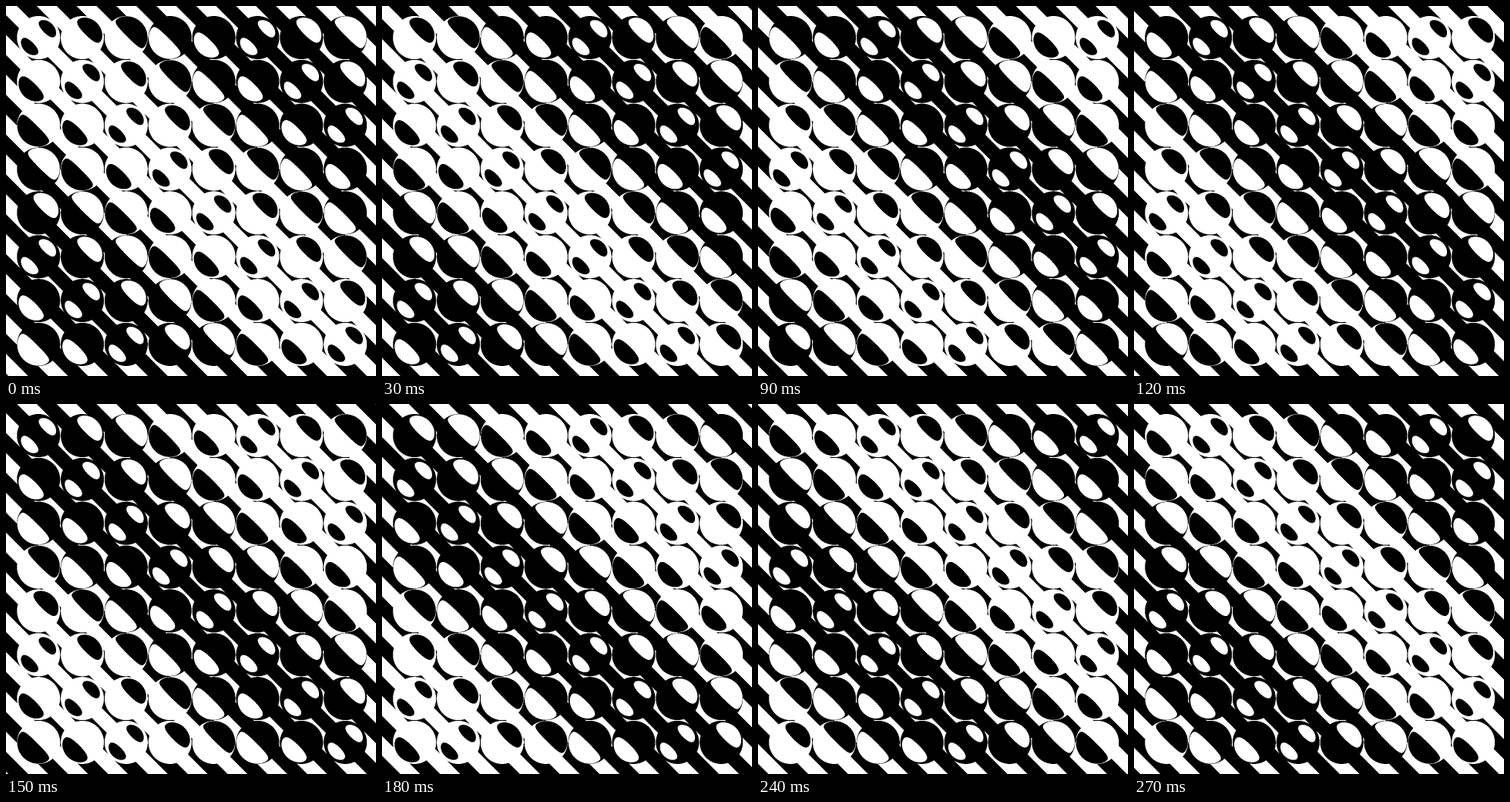
An HTML page with a canvas that plays this animation: 480x480 px, repeating every 300 ms.

```html
<!DOCTYPE html>
<html lang="en">
<head>
<meta charset="utf-8">
<title>Glass balls over stripes</title>
<style>
  html, body { margin: 0; width: 100%; height: 100%; overflow: hidden; background: #fff; }
  canvas { display: block; width: 480px; height: 480px; }
</style>
</head>
<body>
<canvas id="stage" width="480" height="480"></canvas>
<script>
const SIZE = 480, SUB = 3, N = SIZE * SUB;
const COUNT = 8, PITCH = 56.85, RADIUS = 28, X0 = 42.2, Y0 = 41;
const PERIOD = PITCH / 1.1, FALLOFF = 0.65;
const STEPS = 10, STEP_MS = 30;

const ctx = document.getElementById('stage').getContext('2d');
const nearest = v => PITCH * Math.max(0, Math.min(COUNT - 1, Math.round(v / PITCH)));

// Stripe phase at a point; a ball folds the stripes back to its centre at the rim.
function phaseAt(x, y) {
  const cx = nearest(x - X0), cy = nearest(y - Y0);
  const dx = x - X0 - cx, dy = y - Y0 - cy;
  const depth = 1 - (dx * dx + dy * dy) / (RADIUS * RADIUS);
  const bend = depth > 0 ? depth ** FALLOFF : 1;
  return (cx - cy + (dx - dy) * bend) / PERIOD;
}

const phase = new Float32Array(N * N);
for (let j = 0; j < N; j++)
  for (let i = 0; i < N; i++)
    phase[j * N + i] = phaseAt((i + 0.5) / SUB, (j + 0.5) / SUB) + 0.25;

function render(step) {
  const img = ctx.createImageData(SIZE, SIZE);
  const px = new Uint32Array(img.data.buffer);
  const shift = step / STEPS;
  for (let y = 0; y < SIZE; y++)
    for (let x = 0; x < SIZE; x++) {
      let white = 0;
      for (let j = 0; j < SUB; j++)
        for (let i = 0; i < SUB; i++) {
          const p = phase[(y * SUB + j) * N + x * SUB + i] + shift;
          if (p - Math.floor(p) < 0.5) white++;
        }
      const v = Math.round(255 * white / (SUB * SUB));
      px[y * SIZE + x] = 0xff000000 | v << 16 | v << 8 | v;
    }
  return img;
}

const cache = [];
let shown = -1;
function draw(now) {
  const step = Math.floor(now / STEP_MS) % STEPS;
  if (step !== shown) {
    cache[step] = cache[step] || render(step);
    ctx.putImageData(cache[step], 0, 0);
    shown = step;
  }
  requestAnimationFrame(draw);
}
draw(0);
</script>
</body>
</html>
```
